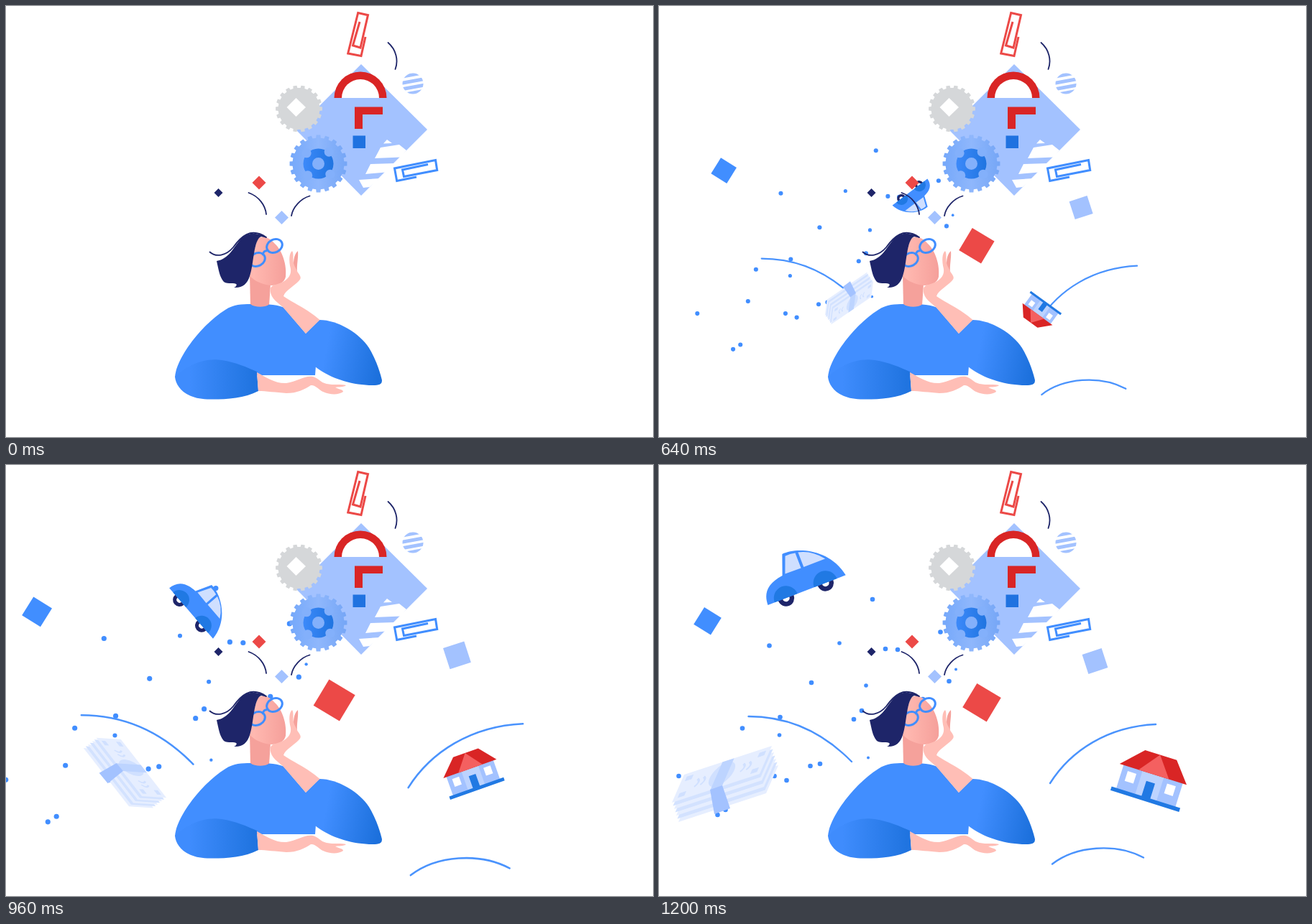
Animation, 900 px wide and 600 px high, one loop 1400 ms. Source, as an HTML page:

```html
<!DOCTYPE html>
<html lang="en">
<head>
<meta charset="utf-8">
<title>Daydream</title>
<style>
  html, body { margin: 0; width: 100%; height: 100%; overflow: hidden; background: #fff; }
  svg { display: block; width: 100vw; height: 100vh; }
</style>
</head>
<body>
<svg viewBox="0 0 900 600" xmlns="http://www.w3.org/2000/svg">
  <defs>
    <linearGradient id="cuff" gradientUnits="userSpaceOnUse" x1="255" y1="0" x2="345" y2="0">
      <stop stop-color="#3f8cfd"/><stop offset="1" stop-color="#2074e0"/>
    </linearGradient>
    <linearGradient id="sleeve" gradientUnits="userSpaceOnUse" x1="445" y1="480" x2="522" y2="495">
      <stop stop-color="#418eff"/><stop offset="1" stop-color="#1c70dc"/>
    </linearGradient>
    <linearGradient id="skin" gradientUnits="userSpaceOnUse" x1="345" y1="0" x2="390" y2="0">
      <stop stop-color="#ffb8b0"/><stop offset="1" stop-color="#f59f9a"/>
    </linearGradient>
    <linearGradient id="cog" gradientUnits="userSpaceOnUse" x1="395" y1="0" x2="474" y2="0">
      <stop stop-color="#75a8fa"/><stop offset=".5" stop-color="#8fb7fc"/><stop offset="1" stop-color="#75a6f6"/>
    </linearGradient>
    <linearGradient id="hub" gradientUnits="userSpaceOnUse" x1="413" y1="0" x2="456" y2="0">
      <stop stop-color="#3d8afa"/><stop offset="1" stop-color="#1f74e0"/>
    </linearGradient>
    <clipPath id="ball"><circle cx="566" cy="108" r="14.5"/></clipPath>
  </defs>

  <g id="burst">
    <g id="dots" fill="#418eff"></g>
    <g fill="none" stroke="#4a93fd" stroke-width="2.4" stroke-linecap="round">
      <path d="M124.500 350C175 350 225 369 268 413"/>
      <path d="M544 443C573 397 625 364 691 361"/>
      <path d="M547 555.500C580 530 635 526 674 546.500"/>
    </g>
    <rect x="-19.500" y="-19.500" width="39" height="39" transform="translate(449 330.700) rotate(31)" fill="#ec4947"/>
    <rect x="-14" y="-14" width="28" height="28" transform="translate(67.500 217.200) rotate(32)" fill="#418eff"/>
    <rect x="-14.200" y="-14.200" width="28.400" height="28.400" transform="translate(606.500 273) rotate(-18)" fill="#a3c2ff"/>
  </g>

  <g id="money">
    <g id="stack"></g>
    <g transform="matrix(.953 -.3125 -.405 .929 -58 -13)">
      <rect width="128" height="42" fill="#e6eeff"/>
      <g fill="#d0e0ff">
        <circle cx="64" cy="21" r="18"/>
        <path d="M6 5h10v7H6zM112 5h10v7h-10zM6 30h10v7H6zM112 30h10v7h-10z"/>
      </g>
      <g fill="none" stroke="#d0e0ff" stroke-width="3">
        <path d="M26 15q8 6 0 12M35 15q8 6 0 12M93 15q8 6 0 12M102 15q8 6 0 12"/>
      </g>
      <rect x="56" width="17" height="42" fill="#bdd4ff"/>
    </g>
    <path d="M-22 8L-5 2L6 34L-16 42Z" fill="#a3c2ff"/>
  </g>

  <g id="car">
    <g id="wheels"></g>
    <path d="M-56.500 0C-56-16-48-28-23-31L-12.500-59C10-61 52-42 59.500 0Z" fill="#418eff"/>
    <path d="M-46.400 0a17 17 0 0 1 34 0zM12.400 0a17 17 0 0 1 34 0z" fill="#2079e3"/>
    <path d="M-9.600-55Q-2-56 5-54V-31.500L-18.500-32Z M9-53.500Q28-49 41-31.500H9Z" fill="#cfdfff"/>
  </g>

  <g id="house">
    <g transform="scale(1.15)">
      <path d="M-37.500-5h75v31h-75z" fill="#a3c2ff"/>
      <path d="M-13.500-5h27v31h-27z" fill="#bcd3ff"/>
      <path d="M-42.500-4L-18-29H22L42.500-4Z" fill="#d92525"/>
      <path d="M1-29L-18.500-4H20Z" fill="#f46060"/>
      <path d="M-30.500 1.500h11v12.500h-11zM19.500 1.500h11v12.500h-11z" fill="#fff"/>
      <path d="M-5.500 6h11v20h-11zM-43.500 25h87v5h-87z" fill="#2179e3"/>
    </g>
  </g>

  <g id="thought">
    <path d="M494 81L586 172L494 264L403 172Z" fill="#a3c2ff"/>
    <path d="M525 191.500L530 186L537 191ZM521 197L547 193L557 201L549 210.500L513 212ZM507 220L540 219L528 231.500L500 234ZM491 242L520 240L506 252L497 253Z" fill="#fff"/>
    <path d="M456.500 128a36.500 36.500 0 0 1 73 0z" fill="#d92525"/>
    <path d="M467 128a26 26 0 0 1 52 0z" fill="#fff"/>
    <path d="M485 140.500h39v10.500h-28v20h-11z" fill="#d92525"/>
    <path d="M482.500 180.500h17.500v17.500h-17.500z" fill="#1f72e0"/>
    <path id="greyGear" fill="#d5d7d9"/>
    <path d="M403.500 128L417 141L403.500 154L390.500 141Z" fill="#fff"/>
    <path id="blueGear" fill="url(#cog)"/>
    <circle cx="434.500" cy="219.500" r="21" fill="url(#hub)"/>
    <g id="notches" fill="#83b0fb"><circle cx="434.500" cy="219.500" r="8.500"/></g>
    <g fill="none" stroke-width="3">
      <path d="M492 22L482.500 55L493 58L503.500 12.700L489.700 9.500L475.700 66L494 69.500L500 43" stroke="#ec4947"/>
      <path d="M587 220.500L551.500 228L553.500 237.500L599.700 228.500L597.500 214.500L540.500 226L543.700 243.500L571 238" stroke="#418eff"/>
    </g>
    <g clip-path="url(#ball)">
      <path d="M550 98.500L582 92.500M550 107.500L582 101.500M550 116L582 110M550 124L582 118" stroke="#a3c2ff" stroke-width="5"/>
    </g>
    <path d="M352 236.500L361.500 246L352 255.500L342.500 246Z" fill="#ec4947"/>
    <path d="M295.500 254L301.500 260L295.500 266L289.500 260Z" fill="#1e2569"/>
    <path d="M383.500 285L393 294.500L383.500 304L374 294.500Z" fill="#a3c2ff"/>
    <path d="M531.500 51C543 61 546 76 541.500 88M337.500 260C352 265 361 278 362 290M422.500 264.500C410 268 399 280 397 292" fill="none" stroke="#1e2569" stroke-width="1.800" stroke-linecap="round"/>
  </g>

  <g id="person">
    <path d="M339 373L340 417C346 422 360 421 366 417L368 387Z" fill="#f5a19b"/>
    <path d="M350 324C358 319 366 322 374 331C384 340 391 360 389 377C387 387 374 391 362 388C352 386 342 380 339 375C341 355 345 340 350 324Z" fill="url(#skin)"/>
    <g fill="none" stroke="#418eff" stroke-width="3">
      <ellipse cx="373.500" cy="334" rx="11.300" ry="9" transform="rotate(-28 373.500 334)"/>
      <ellipse cx="349.500" cy="353" rx="11.300" ry="9" transform="rotate(-28 349.500 353)"/>
      <path d="M363.500 341C360 340 357 343 357.500 347"/>
    </g>
    <path d="M363 323C350 314 335 315 327 324C315 338 310 352 293 355C296 368 297 377 303 384C309 388 318 384 321 388Q320 391 317 392C328 393 336 387 339 376C345 360 344 325 355 321Z" fill="#1e2569"/>
    <path d="M283.500 342.500C292 350 306 348 316 336C326 322 340 307 362 322" fill="none" stroke="#1e2569" stroke-width="1.800" stroke-linecap="round"/>
    <path d="M235 517C236 492 270 445 305 423C317 415 328 415 340 415C346 420 360 420 366 415.500Q377 416 386 419.500L417 456L436 437L430 514H350L300 520Z" fill="#418eff"/>
    <path d="M436 437C462 437 492 456 505 476C514 491 520 508 523 521C523 527 519 528 510 528C478 528 447 516 430 502L417 456Z" fill="url(#sleeve)"/>
    <path d="M235 516C255 497 280 490 300 493C320 496 335 503 349 509L351 536C330 547 300 548 280 547.500C250 547 236 530 235 516Z" fill="url(#cuff)"/>
    <path d="M406 341C400 346 399 358 401 366L405 372C404 360 407 350 406 341Z" fill="#f5a19b"/>
    <path d="M436.500 437L417 456L385 419C375 411 366 404 368 393C370 387 380 388 387 383C393 379 397 374 396 366C393 354 394 344 398 341C401 345 398 354 401 361L406 371C410 376 411 379 408 382C400 391 388 396 386 404C395 411 420 422 436.500 437Z" fill="#ffbeb6"/>
    <path d="M349 510C362 517 375 526 390 525C405 523 415 514 427 516C435 518 437 524 446 526C455 528 468 526 473 528C470 531 462 530 458 531C464 534 469 534 469 537C462 542 450 541 441 537C435 534 430 527 424 528C415 534 405 539 390 539C375 538 362 536 351 536Z" fill="#ffbeb6"/>
  </g>
</svg>
<script>
const LOOP = 1400, STEP = 40, END = 1200;
const $ = id => document.getElementById(id);

function add(parent, tag, attrs) {
  const el = document.createElementNS("http://www.w3.org/2000/svg", tag);
  for (const key in attrs) el.setAttribute(key, attrs[key]);
  $(parent).appendChild(el);
}

function gearPath(cx, cy, outer, inner, teeth) {
  const points = [];
  for (let i = 0; i < teeth; i++) {
    [[-.29, inner], [-.23, outer], [.23, outer], [.29, inner]].forEach(([off, r]) => {
      const a = (i + off) / teeth * 2 * Math.PI;
      points.push((cx + r * Math.cos(a)).toFixed(2) + " " + (cy + r * Math.sin(a)).toFixed(2));
    });
  }
  return "M" + points.join("L") + "Z";
}

$("greyGear").setAttribute("d", gearPath(407.5, 143, 32.5, 29, 18));
$("blueGear").setAttribute("d", gearPath(434.5, 219.5, 40, 36, 20));
for (let i = 0; i < 4; i++) {
  const a = (42 + i * 90) * Math.PI / 180;
  add("notches", "circle", { cx: 434.5 + 22 * Math.cos(a), cy: 219.5 + 22 * Math.sin(a), r: 6.5 });
}

[-29.4, 29.4].forEach(cx => {
  add("wheels", "circle", { cx, cy: 0, r: 11.5, fill: "#1e2569" });
  add("wheels", "circle", { cx, cy: 0, r: 5, fill: "#fff" });
});

// Lower notes of the bundle, bottom first
for (let i = 6; i > 0; i--) {
  add("stack", "path", {
    d: "M-58-13L64-53L47-14L-75 26Z",
    transform: `translate(${i * 1.5} ${i * 4.5})`,
    fill: i % 2 ? "#d3e2ff" : "#e6eeff"
  });
}

const dots = [
  [297, 187], [153.5, 251.5], [315, 256], [332, 257], [212, 303], [282, 342],
  [271, 354], [168.5, 351], [116, 366.5], [104, 414.5], [27.5, 433], [177.5, 439],
  [210.5, 419], [160.5, 433], [81.5, 487], [92.5, 480], [391.5, 232.5], [403.5, 301],
  [367, 326], [224, 416], [251, 248, 2.8], [288, 307, 2.8], [167.5, 376, 2.8],
  [291, 407.5, 2], [413, 284.5, 2]
];
dots.forEach(([cx, cy, r = 3.3]) => add("dots", "circle", { cx, cy, r }));

// Smooth curve through (times, values)
function curve(times, values) {
  const last = times.length - 1;
  const slope = i => {
    const a = Math.max(i - 1, 0), b = Math.min(i + 1, last);
    return (values[b] - values[a]) / (times[b] - times[a]);
  };
  return t => {
    if (t <= times[0]) return values[0];
    if (t >= times[last]) return values[last];
    let i = 0;
    while (t >= times[i + 1]) i++;
    const h = times[i + 1] - times[i], u = (t - times[i]) / h, v = 1 - u;
    return values[i] * (1 + 2 * u) * v * v + values[i + 1] * (3 - 2 * u) * u * u
      + h * u * v * (slope(i) * v - slope(i + 1) * u);
  };
}

const KEYS = [40, 320, 480, 640, 880, 1040, 1200];
const along = (...values) => curve(KEYS, values);

const spread = curve(
  [40, 200, 320, 480, 640, 880, 1000, 1040, 1120, 1160, 1200],
  [0, .233, .475, .7365, .922, 1.043, 1.1, 1.093, 1.045, 1.015, 1]);
const grow = along(0, .22, .38, .528, .732, .872, 1);
const spin = t => .2925 * (END - t);

const flyers = [
  { id: "car", dy: 20,
    x: along(392, 388, 377, 356, 294, 243, 197),
    y: along(430, 374, 318, 267, 209.5, 182.5, 156),
    turn: t => spin(t) - 21 },
  { id: "house", dy: 0,
    x: along(390, 415, 469, 528, 620, 667.5, 686),
    y: along(440, 446, 441, 427, 422, 432, 435),
    turn: along(-350, -285, -214, -144, -45.5, 0, 17.5) },
  { id: "money", dy: 0,
    x: along(400, 358, 311, 264, 190, 141.5, 93),
    y: along(406, 406, 402, 407, 422.5, 436, 444),
    turn: spin }
];

function draw(t) {
  const s = spread(t);
  $("burst").setAttribute("transform", `translate(358 370) scale(${s}) translate(-358 -370)`);
  $("burst").style.display = s > 0 ? "" : "none";
  const k = grow(t);
  for (const f of flyers) {
    const el = $(f.id);
    el.style.display = k > 0 ? "" : "none";
    el.setAttribute("transform",
      `translate(${f.x(t)} ${f.y(t)}) rotate(${f.turn(t)}) scale(${k}) translate(0 ${f.dy})`);
  }
}

function tick() {
  const now = performance.now() % LOOP;
  draw(now < 80 ? 0 : Math.min(END, Math.floor(now / STEP) * STEP));
  requestAnimationFrame(tick);
}
tick();
</script>
</body>
</html>
```
